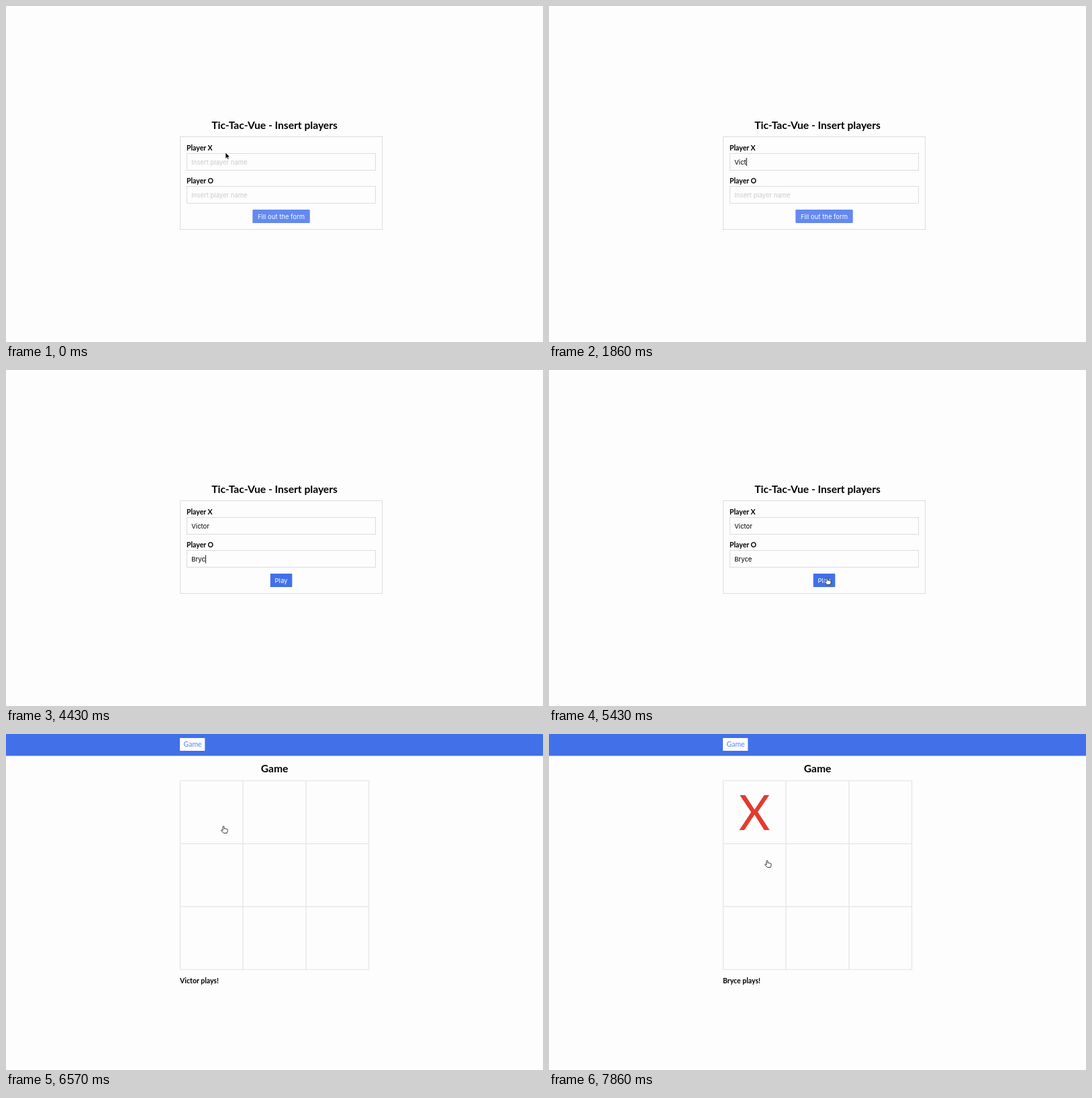
Recreate the animation shown at these times as an HTML page. Size 800 by 500 pixels, loop 8000 ms.

```html
<!DOCTYPE html>
<html lang="en">
<head>
<meta charset="utf-8">
<title>Tic-Tac-Vue</title>
<style>
  html, body { margin: 0; width: 100%; height: 100%; overflow: hidden; background: #fefdfe; }
  svg { display: block; width: 800px; height: 500px; }
  text { font: 9.5px Inter, sans-serif; }
  .title, .label { font: 700 10.5px Lato, sans-serif; }
  .title { font-size: 15.6px; }
  .title, .mid { text-anchor: middle; }
  .box { fill: none; stroke: #dcdbdd; }
  .tab { font: 10.5px Lato, sans-serif; fill: #5a82ec; }
  .mark { font: 72px Lato, sans-serif; fill: #e33b2e; }
  .grid { fill: none; stroke: #e8e7e9; stroke-width: 1.5; }
</style>
</head>
<body>
<svg viewBox="0 0 800 500">
  <g id="form">
    <text class="title" x="400" y="183">Tic-Tac-Vue - Insert players</text>
    <rect class="box" x="259.5" y="194.5" width="301" height="138"/>
    <text class="label" x="269" y="215">Player X</text>
    <rect class="box" x="269.5" y="219.5" width="281" height="25"/>
    <text id="nameX" x="276.3" y="235.7"/>
    <text class="label" x="269" y="264">Player O</text>
    <rect class="box" x="269.5" y="268.5" width="281" height="25"/>
    <text id="nameO" x="276.3" y="285"/>
    <rect id="caret" width="1" height="12"/>
    <rect id="button" y="303" height="20" rx="1"/>
    <text id="action" class="mid" x="410" y="316.7" fill="#fff"/>
  </g>
  <g id="game">
    <rect width="800" height="32.5" fill="#4170e9"/>
    <rect x="259" y="6" width="37.3" height="19" rx=".5" fill="#fff"/>
    <text class="tab" x="264.6" y="19.3">Game</text>
    <text class="title" x="400" y="57">Game</text>
    <path class="grid" d="M259.5 69.5H540.5V350.5H259.5ZM353 69.5V350.5M447 69.5V350.5M259.5 163.2H540.5M259.5 256.8H540.5"/>
    <text id="mark" class="mark mid" x="306" y="143">X</text>
    <text id="turn" class="label" x="259" y="371"/>
  </g>
  <g id="mouse">
    <path id="arrow" d="M0 0V9.2L2.1 7.3 3.5 10.3 5 9.6 3.7 6.7H6.5Z" stroke="#fff" stroke-width=".6"/>
    <path id="beam" d="M-2-5Q0-5 0-3.8Q0-5 2-5M0-3.8V3.8M-2 5Q0 5 0 3.8Q0 5 2 5" fill="none" stroke="#333" stroke-width=".8"/>
    <path id="hand" d="M-1 5.5V.2a1 1 0 0 1 2 0V3q1-.8 1.9.2q1.1-.6 1.8.4q1.4-.2 1.4 1.2V6.5L5 9.5H.2L-3 6q-.6-1.4.6-1.5q.8.1 1.4 1Z" fill="#fff" stroke="#222" stroke-width=".9" stroke-linejoin="round"/>
  </g>
</svg>
<script>
const $ = id => document.getElementById(id);
const LOOP = 8000, FPS = 7;
const PLAYERS = ["Victor", "Bryce"];
const GAME_START = 39, MARKED = 48;

// Mouse stops: tick, x, y
const STOPS = [
  [0, 327, 218], [2, 327, 231], [32, 335, 240], [33, 345, 256], [36, 414, 310],
  [41, 414, 310], [46, 324, 138], [49, 324, 138], [55, 325, 189]
];

const clamp = (v, lo, hi) => Math.min(hi, Math.max(lo, v));
const show = (el, on) => el.style.display = on ? "" : "none";

function mouseAt(tick) {
  const next = STOPS.findIndex(s => s[0] > tick);
  if (next < 0) return STOPS[STOPS.length - 1].slice(1);
  const [t0, x0, y0] = STOPS[next - 1], [t1, x1, y1] = STOPS[next];
  const p = (tick - t0) / (t1 - t0), e = p * p * (3 - 2 * p);
  return [x0 + (x1 - x0) * e, y0 + (y1 - y0) * e];
}

function caretOpacity(tick) {
  if (tick < 2 || tick >= 35) return 0;
  if (tick === 5 || tick === 21) return 0.5;
  return (tick > 5 && tick < 8) || (tick > 21 && tick < 25) ? 0 : 1;
}

function drawField(el, value) {
  el.textContent = value || "Insert player name";
  el.setAttribute("fill", value ? "#000" : "#cacaca");
}

function drawForm(tick) {
  const typedX = PLAYERS[0].slice(0, clamp(tick - 9, 0, 6));
  const typedO = PLAYERS[1].slice(0, clamp(tick - 27, 0, 5));
  drawField($("nameX"), typedX);
  drawField($("nameO"), typedO);

  const second = tick >= 18;
  const field = second ? $("nameO") : $("nameX");
  const typed = second ? typedO : typedX;
  $("caret").setAttribute("x", 276.3 + (typed ? field.getComputedTextLength() : 0));
  $("caret").setAttribute("y", second ? 275.5 : 226);
  $("caret").setAttribute("opacity", caretOpacity(tick));

  const ready = typedO !== "", width = ready ? 32.6 : 85.4;
  $("button").setAttribute("x", 410 - width / 2);
  $("button").setAttribute("width", width);
  $("button").setAttribute("fill", ready ? "#4170e9" : "#6489ef");
  $("action").textContent = ready ? "Play" : "Fill out the form";
}

function drawMouse(tick) {
  const [x, y] = mouseAt(tick);
  const onInput = (y > 219 && y < 245) || (y > 268 && y < 294);
  const onButton = x > 393 && y > 303;
  const kind = tick >= GAME_START || onButton ? "hand" : onInput ? "beam" : "arrow";
  for (const id of ["arrow", "beam", "hand"]) show($(id), id === kind);
  show($("mouse"), tick < 10 || tick >= 33);
  $("mouse").setAttribute("transform", `translate(${x} ${y})`);
}

function draw() {
  const time = performance.now() % LOOP;
  const tick = Math.floor((time + 5) * FPS / 1000) % (LOOP * FPS / 1000);
  const playing = tick >= GAME_START, marked = tick >= MARKED;
  show($("form"), !playing);
  show($("game"), playing);
  if (!playing) drawForm(tick);
  show($("mark"), marked);
  $("turn").textContent = `${PLAYERS[marked ? 1 : 0]} plays!`;
  drawMouse(tick);
  requestAnimationFrame(draw);
}
draw();
</script>
</body>
</html>
```
